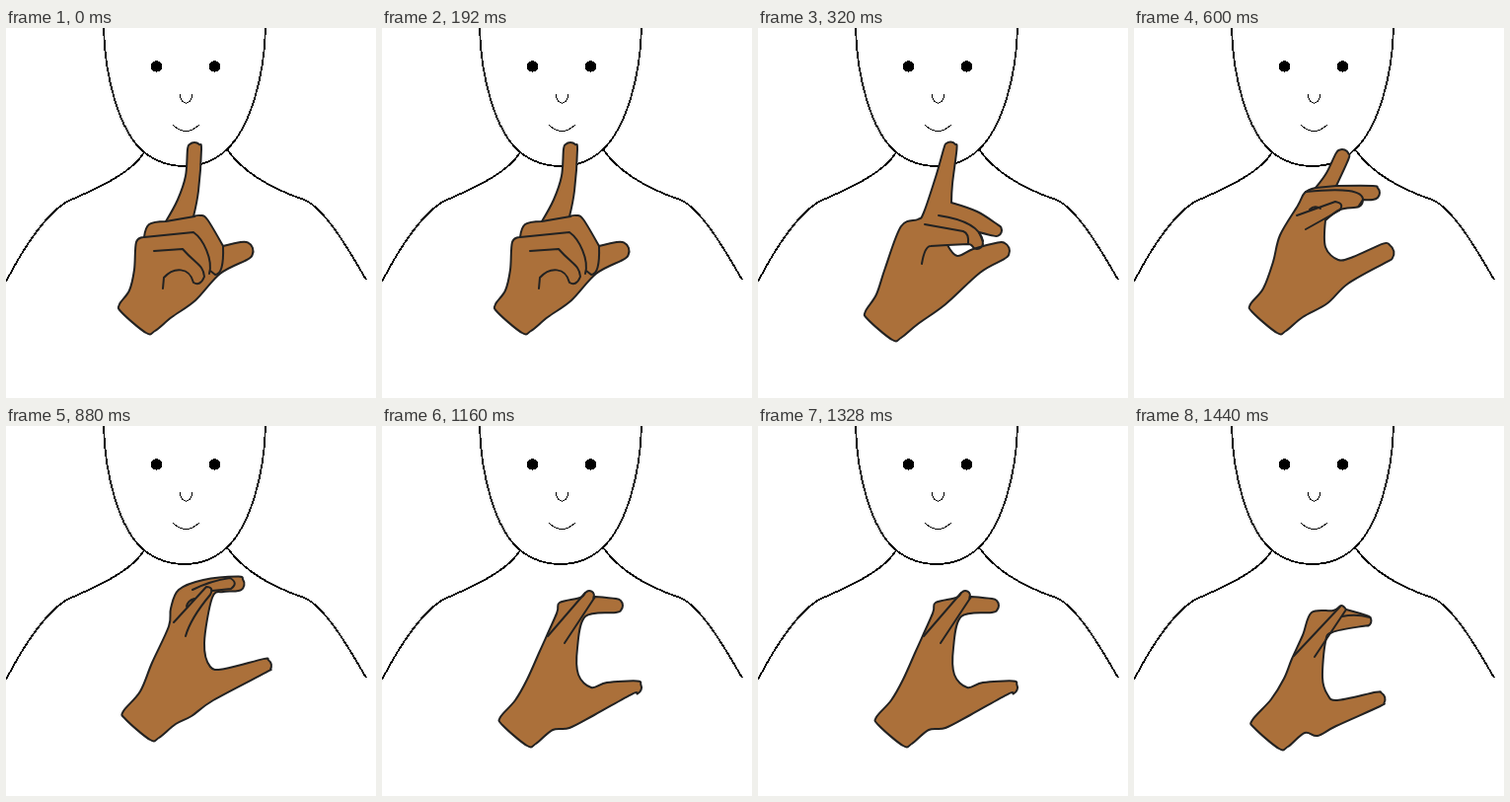
An HTML page that plays this animation: 375x375 px, repeating every 1.72 s.

```html
<!DOCTYPE html>
<html lang="en">
<head>
<meta charset="utf-8">
<title>Hand sign</title>
<style>
html, body { margin: 0; width: 100%; height: 100%; overflow: hidden; background: #fff; }
svg { display: block; width: 375px; height: 375px; }
path { fill: none; stroke: #000; stroke-width: 1.8; }
.face { stroke-width: 1; }
#skin, #creases { stroke: #222; stroke-width: 2; stroke-linecap: round; stroke-linejoin: round; }
#skin { fill: #ab703a; }
</style>
</head>
<body>
<svg viewBox="0 0 375 375">
  <g shape-rendering="crispEdges">
    <path d="M99 0C100 48 114 104 140 126Q158 140 181 140Q206 140 224 123C248 100 262 48 263 0"/>
    <path d="M140 126C128 146 98 160 64 175C42 186 18 222 0 257"/>
    <path d="M224 123C240 146 270 163 302 174C322 182 346 222 365 255"/>
    <circle cx="152.500" cy="39" r="5.700"/>
    <circle cx="211.500" cy="39" r="5.700"/>
    <path class="face" d="M176.500 67C176.500 79 188.500 79 188.500 67"/>
    <path class="face" d="M169 98Q182 111 196 98"/>
  </g>
  <path id="skin"/>
  <path id="creases"/>
</svg>
<script>
// The base of the hand has the same shape in every pose.
const heel = (x, y) => [[x, y], [x + 2, y + 8], [x + 27, y + 29], [x + 36, y + 27], [x + 53, y + 13]];

// Round fingertip: a half circle facing the given direction
const tip = (x, y, r, degrees) => [90, 45, 0, -45, -90].map(turn => {
  const a = (degrees + turn) * Math.PI / 180;
  return [x + r * Math.cos(a), y + r * Math.sin(a)];
});

const corner = (x, y) => [x, y, true];

// Outlines run from the heel over thumb and fingers back down the palm.
const poses = [
  {
    outline: [
      ...heel(115, 280), [192, 276], [217, 249], ...tip(241, 226, 9.5, -20), corner(220, 221),
      [204, 194], [197, 190], corner(190, 191), [195, 165], ...tip(191, 123, 7, -90),
      [182, 150], [174, 174], corner(162, 196), [145, 199], corner(140, 212),
      [132, 217], [130, 245], [125, 266]
    ],
    creases: 'M162 196L191 191M220 221Q221 250 212 250L207 246M140 212L190 207C200 214 210 235 206 249' +
      'M150 226L179 224C193 240 200 240 201 252Q197 262 190 258C186 242 170 242 160 253L159 264'
  },
  {
    outline: [
      ...heel(109, 287), [190, 280], [225, 248], ...tip(246, 226, 9, -20), [218, 224], [202, 231],
      corner(192, 220), corner(213, 219), ...tip(222, 218, 6, 70), corner(224, 207),
      ...tip(241, 205, 6, 20), [222, 186], corner(196, 177), [197, 158], ...tip(195, 122, 6.5, -85),
      [181, 148], [168, 187], [162, 194], [145, 201], [129, 243], [120, 270]
    ],
    creases: 'M183 190Q224 196 228 216M169 199L208 206Q214 208 213 219M166 239Q169 221 175 221L192 220'
  },
  {
    outline: [
      ...heel(118, 280), [196, 279], [217, 259], ...tip(254, 228, 9.5, -10), [222, 232], [207, 235],
      [194, 222], corner(194, 195), [209, 184], [228, 181], corner(232, 174), ...tip(242, 167, 7, 0),
      corner(205, 160), ...tip(211, 130, 7, -68), [195, 147], corner(184, 162),
      [173, 167], [166, 180], [148, 210], [141, 237], [131, 264]
    ],
    creases: 'M184 162L205 160M174 166Q232 160 232 174L228 180' +
      'M165 190L204 176Q214 178 208 185L174 204M178 184Q183 179 189 183'
  },
  {
    outline: [
      ...heel(119, 289), [188, 294], [210, 278], ...tip(262, 243, 7, -10), [222, 246], [207, 244],
      [201, 220], [209, 174], [220, 168], ...tip(234, 160, 7.5, 10), [200, 156],
      [175, 166], [167, 185], [165, 203], [148, 240], [136, 269]
    ],
    creases: 'M170 199L203 163Q211 163 207 171Q187 195 182 213' +
      'M189 166Q207 157 227 154Q236 159 228 165L209 167M183 183Q184 177 191 175'
  },
  {
    outline: [
      ...heel(120, 295), [190, 306], [215, 293], ...tip(256, 265, 7, 20), [228, 260], [212, 265],
      [199, 252], [198, 225], [206, 193], ...tip(237, 182, 7, 0), corner(216, 173),
      ...tip(210, 172, 5, -60), [201, 174], [180, 179], [177, 190], [160, 228], [147, 257], [135, 278]
    ],
    creases: 'M168 213L206 169M216 173L185 220'
  },
  {
    outline: [
      ...heel(120, 298), [186, 314], [205, 304], ...tip(247, 277, 7.5, -15), [206, 278], [196, 272],
      [191, 255], [194, 219], [201, 209], ...tip(235, 197.5, 5.5, 20), corner(215, 186),
      [210, 182], [202, 187], [180, 189], [171, 212], [160, 236], [152, 256], [139, 277]
    ],
    creases: 'M162 233L209 183M215 186L183 234M211 193Q225 190 239 194'
  }
];

// Closed Catmull-Rom curve; the tangent vanishes at corners.
function smooth(points) {
  const n = points.length;
  const at = i => points[(i + n) % n];
  const handle = (i, side) => {
    const [x, y, sharp] = at(i), a = at(i - 1), b = at(i + 1);
    const k = sharp ? 0 : side / 6;
    return [x + k * (b[0] - a[0]), y + k * (b[1] - a[1])];
  };
  const parts = points.map((p, i) =>
    `C${handle(i, 1)} ${handle(i + 1, -1)} ${at(i + 1).slice(0, 2)}`);
  return `M${points[0].slice(0, 2)}${parts.join('')}Z`;
}

const skin = document.getElementById('skin');
const creases = document.getElementById('creases');

function draw() {
  // The first pose holds 320 ms, the others 280 ms.
  const t = performance.now() % 1720;
  const pose = poses[Math.max(0, Math.floor((t - 40) / 280))];
  skin.setAttribute('d', smooth(pose.outline));
  creases.setAttribute('d', pose.creases);
  requestAnimationFrame(draw);
}
draw();
</script>
</body>
</html>
```
